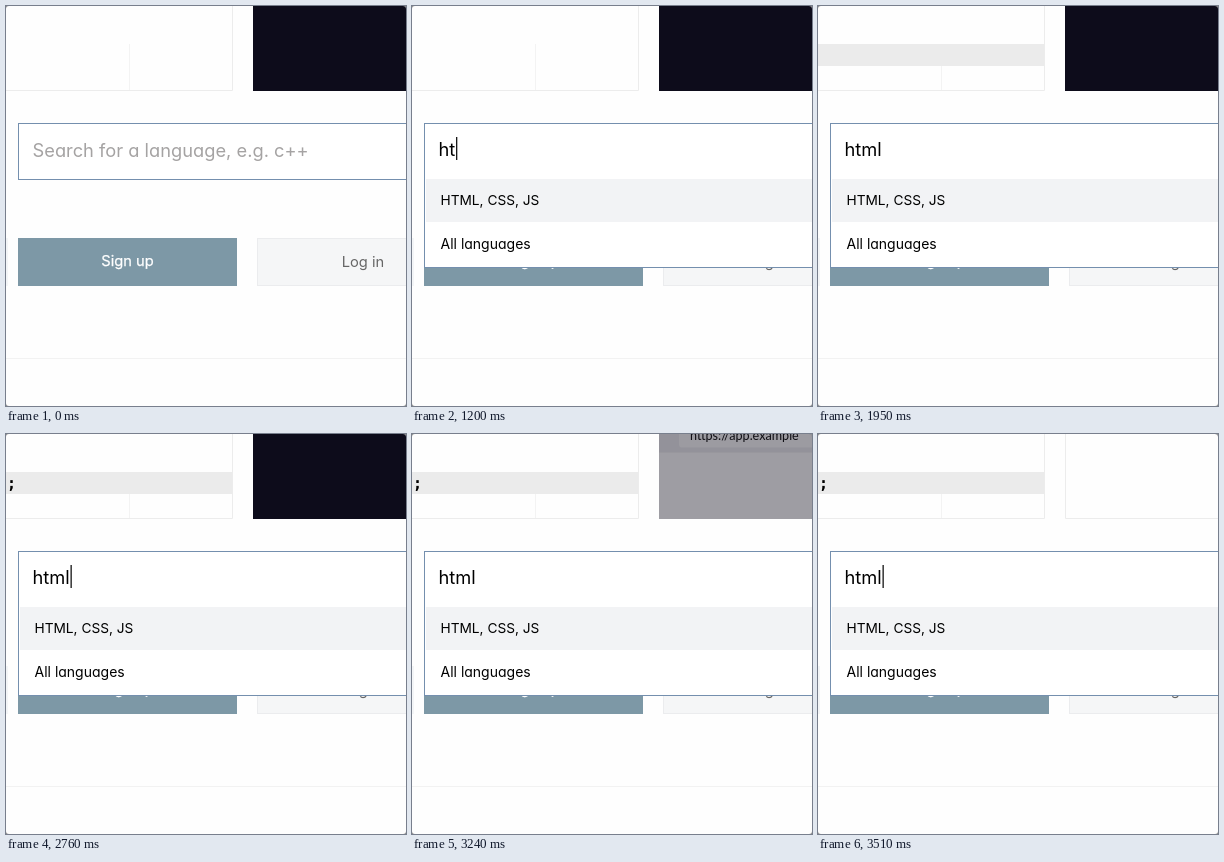
An HTML page for the animation above (3540 ms loop, 400 by 400 pixels).

```html
<!DOCTYPE html>
<html lang="en">
<head>
<meta charset="utf-8">
<title>Language search</title>
<style>
  html, body { margin: 0; width: 100%; height: 100%; overflow: hidden; background: #8c8c8c; }
  svg { display: block; width: 400px; height: 400px; border-radius: 3px; background: #fefefe; }
  text { font-family: Inter, "Open Sans", sans-serif; font-feature-settings: "cv11"; }
  .field { font-size: 18.3px; }
  .row { font-size: 14px; }
  .button { font-size: 14.7px; text-anchor: middle; }
  .url { font: 12.6px Lato, sans-serif; }
  .code { font: bold 15px "DejaVu Sans Mono", monospace; }
  .hair { fill: none; stroke: #ececec; }
  .edge { fill: #fff; stroke: #748fae; }
</style>
</head>
<body>
<svg viewBox="0 0 400 400">
  <defs>
    <clipPath id="pane"><rect x="247" width="153" height="85"/></clipPath>
  </defs>

  <!-- editor pane -->
  <rect id="line" y="38" width="226" height="22" fill="#ebebeb"/>
  <path class="hair" d="M0 84.5H226.5V0"/>
  <path class="hair" d="M123.5 38V84" stroke-opacity=".6"/>
  <text id="code" class="code" x="1" y="55">;</text>

  <!-- preview pane -->
  <g clip-path="url(#pane)">
    <rect x="247" width="153" height="85" fill="#0d0c1b"/>
    <g id="preview">
      <rect x="247" width="160" height="240" fill="#fefefe"/>
      <g id="chrome">
        <rect x="247" width="160" height="34" fill="#ececee"/>
        <rect x="267" y="6" width="140" height="23" rx="3" fill="#fafafa"/>
        <text class="url" x="278" y="21.5" fill="#111">https://app.example</text>
      </g>
    </g>
    <path id="frame" class="hair" d="M247.5 0V84.5H400"/>
  </g>

  <!-- buttons -->
  <rect y="232" width="2" height="48" fill="#f3f5f7"/>
  <rect x="12" y="232" width="219" height="48" fill="#7d98a6"/>
  <text class="button" x="121.5" y="260" fill="#fff" stroke="#fff" stroke-width=".25">Sign up</text>
  <rect x="251.5" y="232.5" width="160" height="47" fill="#f5f6f7" stroke="#ebecee"/>
  <text class="button" x="357" y="261" fill="#666">Log in</text>
  <path class="hair" d="M0 352.5H400" stroke-opacity=".6"/>

  <!-- search field -->
  <rect class="edge" x="12.5" y="117.5" width="400" height="56"/>
  <g id="list">
    <rect class="edge" x="12.5" y="117.5" width="400" height="144"/>
    <rect x="14" y="173" width="386" height="43" fill="#f2f3f5"/>
    <text class="row" x="28.5" y="199" style="font-size:13.7px">HTML, CSS, JS</text>
    <text class="row" x="28.5" y="243">All languages</text>
  </g>
  <text id="hint" class="field" x="26.5" y="151" fill="#a5a3a3">Search for a language, e.g. c++</text>
  <text id="typed" class="field" x="26.5" y="150"></text>
  <rect id="caret" y="131" width="1.2" height="23"/>
</svg>
<script>
  const LOOP = 3540;
  const $ = id => document.getElementById(id);
  const [line, code, preview, chrome, frame, list, hint, typed, caret] =
    ["line", "code", "preview", "chrome", "frame", "list", "hint", "typed", "caret"].map($);

  // [time, value] steps
  const KEYS = [[0, ""], [840, "h"], [1110, "ht"], [1290, "htm"], [1500, "html"]];
  const CARET = [[0, 0], [750, 1], [1950, 0], [2400, 1], [2910, 0], [3420, 1]];

  const stepAt = (steps, t) => steps.reduce((v, [at, next]) => t >= at ? next : v, steps[0][1]);
  const ramp = (t, from, to) => Math.min(1, Math.max(0, (t - from) / (to - from)));
  const show = (el, on) => el.setAttribute("opacity", +on);

  function render(t) {
    const word = stepAt(KEYS, t);
    if (typed.textContent !== word) typed.textContent = word;
    show(hint, !word);
    show(list, word);
    const end = word ? typed.getComputedTextLength() + 0.8 : 0;
    caret.setAttribute("x", 26.5 + end);
    show(caret, stepAt(CARET, t));

    show(line, ramp(t, 1710, 1860));
    show(code, t >= 2280);

    // the preview window rises at a steady pace while it fades in
    const rise = 35 - (t - 3120) * 50 / 120;
    preview.setAttribute("transform", `translate(0 ${Math.max(-120, rise)})`);
    const fade = ramp(t, 2952, 3432);
    show(preview, fade);
    show(frame, fade === 1);
  }

  const start = performance.now();
  function tick() {
    render((performance.now() - start) % LOOP);
    requestAnimationFrame(tick);
  }
  tick();
</script>
</body>
</html>
```
